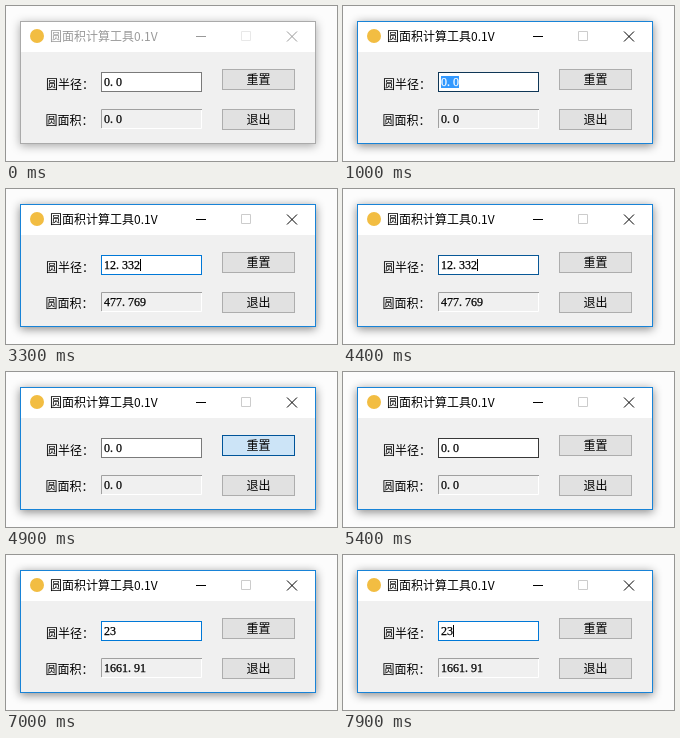
These frames come from a looping animation (331 by 155 pixels, 8000 ms). An HTML page:

```html
<!DOCTYPE html>
<html lang="zh-CN">
<head>
<meta charset="utf-8">
<style>
html, body { margin: 0; width: 100%; height: 100%; overflow: hidden; background: #fcfcfc; }
svg { display: block; width: 331px; height: 155px; }
text { font: 12px "Noto Sans CJK SC", "Noto Sans CJK", sans-serif; white-space: pre; }
.num { font-family: "Liberation Serif", serif; stroke-width: .25px; }
.btn { fill: #e1e1e1; stroke: #adadad; }
</style>
</head>
<body>
<svg viewBox="0 0 331 155">
  <rect id="frame" x="14.5" y="15.5" width="295" height="122" fill="#f0f0f0"/>
  <rect x="15" y="16" width="294" height="30" fill="#fff"/>
  <circle cx="31" cy="30" r="7" fill="#f2bd42"/>
  <text id="title" x="44" y="34.5">圆面积计算工具0.1V</text>
  <g id="controls" fill="none">
    <path d="M190 30.5h10M281 25.500l10 10m0-10l-10 10"/>
    <path id="max" d="M235.500 25.500h9v9h-9z"/>
  </g>

  <text x="40" y="82.500">圆半径：</text>
  <text x="39.500" y="118.500">圆面积：</text>

  <rect id="field" x="95.500" y="66.500" width="100" height="19" fill="#fff"/>
  <rect id="selection" x="98" y="70" width="18" height="12" fill="#3399ff"/>
  <text id="radius" class="num" y="80"></text>
  <rect id="caret" y="70" width="1" height="12"/>

  <path d="M95.500 122V103.500H196" fill="none" stroke="#a0a0a0"/>
  <path d="M96 122.500H195.500V104" fill="none" stroke="#fff"/>
  <text id="area" class="num" y="117"></text>

  <rect id="reset" class="btn" x="216.500" y="63.500" width="72" height="20"/>
  <text x="240.500" y="78">重置</text>
  <rect class="btn" x="216.500" y="103.500" width="72" height="20"/>
  <text x="240.500" y="118">退出</text>
</svg>
<script>
const LOOP = 8000, TEXT_X = 98, CHAR = 6;
const IDLE = '#7a7a7a', HOVER = '#171717', FOCUS = '#0078d7';
const el = id => document.getElementById(id);

const typed = [[0, '0.0'], [1400, '1'], [1500, '12'], [2300, '12.'], [2500, '12.3'],
  [2700, '12.33'], [3300, '12.332'], [4900, '0.0'], [6000, '2'], [6400, '23']];
const carets = [[1400, 2000], [2300, 3900], [4400, 4900], [6000, 7000], [7500, 8000]];
const selections = [[1000, 1400], [5800, 6000]];
const border = [[0, IDLE], [500, IDLE], [700, HOVER], [900, HOVER], [1200, FOCUS],
  [4300, FOCUS], [4600, HOVER], [4800, IDLE], [5200, IDLE], [5500, HOVER],
  [5700, HOVER], [6000, FOCUS]];
const btnFill = [[0, '#e1e1e1'], [4400, '#e1e1e1'], [4600, '#e5f1fb'], [4700, '#e5f1fb'],
  [4800, '#cce4f7'], [4900, '#cce4f7'], [5100, '#e5f1fb'], [5200, '#e5f1fb'], [5400, '#e1e1e1']];
const btnEdge = [[0, '#adadad'], [4400, '#adadad'], [4600, FOCUS], [4700, FOCUS],
  [4800, '#005499'], [4900, '#005499'], [5100, FOCUS], [5200, FOCUS], [5400, '#adadad']];

const inside = (spans, t) => spans.some(([a, b]) => t >= a && t < b);

// Blend between the two colour keys around t
function fade(keys, t) {
  const i = keys.findLastIndex(k => k[0] <= t);
  const [t0, from] = keys[i], [t1, to] = keys[i + 1] || [LOOP, from];
  return `color-mix(in srgb, ${to} ${100 * (t - t0) / (t1 - t0)}%, ${from})`;
}

function write(node, s, color) {
  node.setAttribute('x', [...s].map((c, i) => TEXT_X + CHAR * i).join(' '));
  node.textContent = s;
  node.style.fill = node.style.stroke = color;
}

function draw() {
  const t = Math.floor(performance.now() % LOOP / 100) * 100;
  const active = t >= 600;
  el('frame').style.stroke = active ? '#1883d7' : '#aaa';
  el('frame').style.filter = `drop-shadow(0 2px 5px ${active ? '#0007' : '#0005'})`;
  el('title').style.fill = active ? '#000' : '#999';
  el('controls').style.stroke = active ? '#000' : '#999';
  el('max').style.stroke = active ? '#ccc' : '#e8e8e8';

  const value = typed.findLast(k => k[0] <= t)[1];
  const selected = inside(selections, t);
  const area = String(+(3.1416 * value ** 2).toPrecision(6));
  write(el('radius'), value, selected ? '#fff' : '#000');
  write(el('area'), area === '0' ? '0.0' : area, '#000');
  el('selection').style.opacity = +selected;
  el('caret').style.opacity = +inside(carets, t);
  el('caret').setAttribute('x', TEXT_X + CHAR * value.length);

  el('field').style.stroke = fade(border, t);
  el('reset').style.fill = fade(btnFill, t);
  el('reset').style.stroke = fade(btnEdge, t);
  requestAnimationFrame(draw);
}
draw();
</script>
</body>
</html>
```
